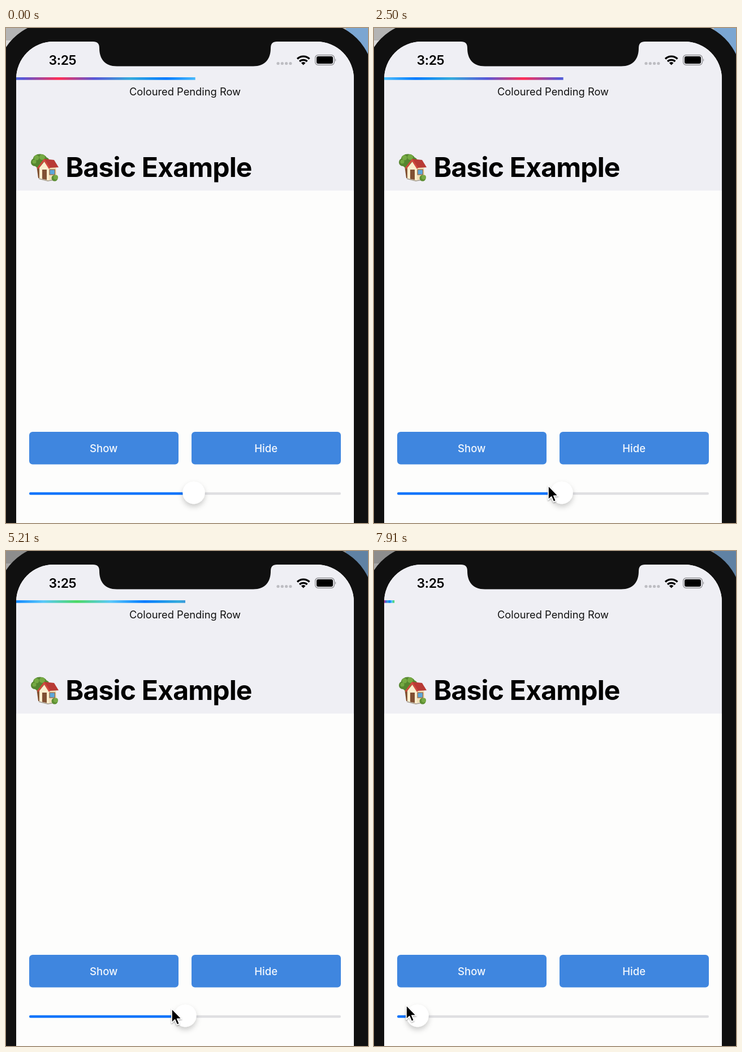
Recreate the animation shown at these times as an HTML page. Size 640 by 874 pixels, loop 8000 ms.

```html
<!DOCTYPE html>
<html lang="en">
<head>
<meta charset="utf-8">
<title>Loading bar demo</title>
<style>
  html, body { margin: 0; width: 100%; height: 100%; overflow: hidden; background: #101010; }
  svg { display: block; width: 100%; height: 100%; }
  text { font-family: Inter, Roboto, sans-serif; }
  .button { font-size: 18.5px; font-weight: 500; fill: #f4f8fd; text-anchor: middle; }
</style>
</head>
<body>
<svg viewBox="0 0 640 874">
  <defs>
    <linearGradient id="spectrum" gradientUnits="userSpaceOnUse" spreadMethod="repeat" y1="0" y2="0"></linearGradient>
    <filter id="thumbShadow" x="-50%" y="-50%" width="200%" height="220%">
      <feDropShadow dx="0" dy="5" stdDeviation="5" flood-opacity=".2"/>
    </filter>
    <filter id="cursorShadow" x="-50%" y="-50%" width="200%" height="200%">
      <feDropShadow dx="0" dy="1.5" stdDeviation="1.2" flood-opacity=".35"/>
    </filter>
    <clipPath id="screen"><rect x="18" y="24" width="597" height="950" rx="66"/></clipPath>
  </defs>

  <!-- desktop behind the phone -->
  <rect width="601" height="60" fill="#d8d8d8"/>
  <rect width="601" height="22" fill="#b4b4b4"/>
  <rect x="601" width="39" height="60" fill="#7ba6d2"/>
  <rect id="dim" width="640" height="60" fill="#000" opacity="0"/>

  <rect x="-17" y="-11" width="667" height="1100" rx="101" fill="#101010"/>

  <g clip-path="url(#screen)">
    <rect x="18" y="24" width="597" height="850" fill="#fdfdfc"/>
    <rect x="18" y="24" width="597" height="263" fill="#efeff4"/>
    <rect id="bar" x="18" y="87" height="4.7" fill="url(#spectrum)"/>
  </g>
  <path d="M154 23V24Q165 24 165 35C165 55 175 67.500 196 67.500H437C458 67.500 468 55 468 35Q468 24 479 24V23Z" fill="#101010"/>

  <!-- status bar -->
  <text x="75.500" y="65" font-size="23" font-weight="600" letter-spacing="-.4">3:25</text>
  <g fill="#bdbdc2">
    <circle cx="481" cy="62.500" r="2.600"/><circle cx="488.300" cy="62.500" r="2.600"/>
    <circle cx="495.600" cy="62.500" r="2.600"/><circle cx="502.900" cy="62.500" r="2.600"/>
  </g>
  <g fill="none" stroke="#000" stroke-width="3.300">
    <path d="M515 54.500A15.500 15.500 0 0 1 536.500 54.500"/>
    <path d="M519 59A9.800 9.800 0 0 1 532.500 59"/>
  </g>
  <path d="M525.700 65.500L521.800 61.500Q525.700 58.500 529.600 61.500Z"/>
  <rect x="546.700" y="47.700" width="33.600" height="17.600" rx="5" fill="none" stroke="#8e8e92" stroke-width="1.400"/>
  <rect x="549" y="50" width="29" height="13" rx="3"/>
  <path d="M582 53.500Q584.500 56.500 582 59.500Z" fill="#8e8e92"/>

  <!-- heading -->
  <text x="316.500" y="119" font-size="18.300" text-anchor="middle" fill="#111">Coloured Pending Row</text>
  <text x="105.500" y="263" font-size="48" font-weight="700" letter-spacing="-.8">Basic Example</text>

  <!-- house with tree -->
  <path d="M54 243L57 265H63L64 243Z" fill="#825333"/>
  <g fill="#55862f">
    <circle cx="51" cy="237" r="7"/><circle cx="58" cy="239" r="8"/>
    <circle cx="69" cy="236" r="8"/><ellipse cx="60" cy="231" rx="12" ry="8.500"/>
  </g>
  <g fill="#75a943"><circle cx="54" cy="229" r="4.500"/><circle cx="64" cy="228" r="5"/><circle cx="50" cy="236" r="3.500"/></g>
  <path d="M59 247L68 236L88 240L90 266L73 269L59 265Z" fill="#f1dfb8"/>
  <path d="M59 247L68 236L76 246V269L59 265Z" fill="#fbedcd"/>
  <path d="M67 231L85 233L93 246L76 247Z" fill="#b83a35"/>
  <path d="M56 248L67.500 233L77 248" fill="none" stroke="#cf4a3e" stroke-width="3" stroke-linejoin="round"/>
  <path d="M64 250H72V268L64 266.500Z" fill="#805033"/>
  <rect x="77" y="250" width="9.500" height="9" fill="#5ca6da" stroke="#9a6a42" stroke-width="1.300"/>
  <path d="M58 266L74 270L91 267" fill="none" stroke="#a49c8c" stroke-width="1.500"/>
  <circle cx="86" cy="265" r="5.500" fill="#5b8d31"/><circle cx="88" cy="263.500" r="4" fill="#76a944"/>

  <!-- controls -->
  <g fill="#3f86df"><rect x="41" y="713" width="264" height="57.500" rx="6"/><rect x="328" y="713" width="264" height="57.500" rx="6"/></g>
  <text class="button" x="172.700" y="748.500">Show</text>
  <text class="button" x="459.700" y="748.500">Hide</text>
  <rect x="41" y="819.700" width="551" height="4.500" rx="2.200" fill="#dfdfe2"/>
  <rect id="fill" x="41" y="819.700" height="4.500" rx="2.200" fill="#0b74fb"/>
  <circle id="thumb" cy="820.500" r="19.700" fill="#fff" filter="url(#thumbShadow)"/>
  <path id="cursor" d="M0 0V25L5.600 19.700L9.400 28.500L13.600 26.700L9.800 18H17.500Z" stroke="#fff" stroke-width="1.700" stroke-linejoin="round" filter="url(#cursorShadow)"/>
</svg>

<script>
const LOOP = 8;
const SCREEN_X = 18, SCREEN_WIDTH = 597;
const SLIDER_START = 61.5, SLIDER_TRAVEL = 510;
const byId = id => document.getElementById(id);
const set = (id, attributes) => {
  for (const name in attributes) byId(id).setAttribute(name, attributes[name]);
};

const palette = ['#4cd964', '#5ac8fa', '#007aff', '#34aadc', '#5856d6', '#ff2d55'];
const stops = [...palette, ...palette.slice(0, -1).reverse()];
byId('spectrum').innerHTML = stops.map((color, i) =>
  `<stop offset="${i / (stops.length - 1)}" stop-color="${color}"/>`).join('');

// Each key is [seconds, value, ...].
const thumbKeys = [[4.95, 332], [5.21, 317], [6.47, 204], [7.91, 77]];
const cursorKeys = [
  [0.3, 343, 880], [0.84, 324, 776], [1.1, 321, 757], [1.42, 321, 757],
  [1.6, 320, 773], [2.3, 308, 808], [2.9, 308, 808], [3.6, 313, 809],
  [4.8, 313, 809], [5.21, 293, 808], [6.47, 183, 814], [7.91, 57, 802]
];

function sample(keys, time) {
  const next = keys.findIndex(key => key[0] > time);
  if (next === 0) return keys[0].slice(1);
  if (next < 0) return keys.at(-1).slice(1);
  const a = keys[next - 1], b = keys[next];
  const mix = (time - a[0]) / (b[0] - a[0]);
  return a.slice(1).map((value, i) => value + (b[i + 1] - value) * mix);
}

function draw(time) {
  const [thumbX] = sample(thumbKeys, time);
  const [cursorX, cursorY] = sample(cursorKeys, time);
  const width = (thumbX - SLIDER_START) / SLIDER_TRAVEL * SCREEN_WIDTH;
  const start = SCREEN_X + width * (0.2154 * time - 0.763);

  set('bar', { width });
  set('spectrum', { x1: start, x2: start + 2 * width });
  set('fill', { width: thumbX - 41 });
  set('thumb', { cx: thumbX });
  set('cursor', { transform: `translate(${cursorX} ${cursorY})` });
  set('dim', { opacity: time < 4.6 ? 0 : 0.22 });
}

const origin = performance.now();
function tick() {
  draw((performance.now() - origin) / 1000 % LOOP);
  requestAnimationFrame(tick);
}
tick();
</script>
</body>
</html>
```
